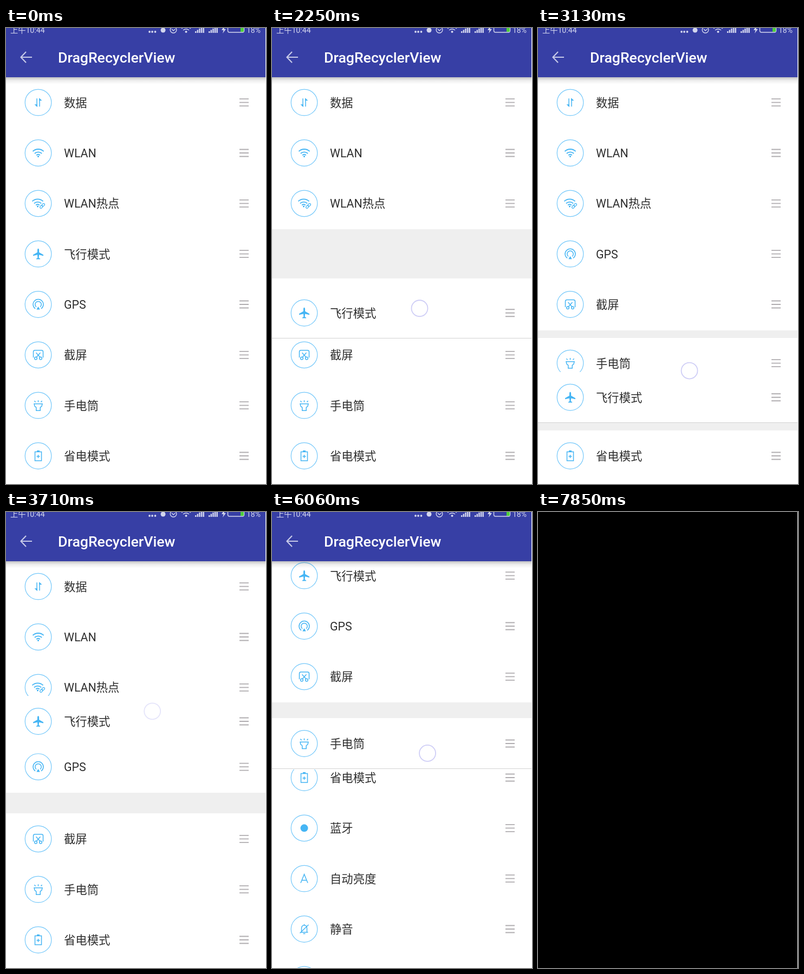
These frames come from a looping animation (480x843 px, 7950 ms). An HTML page:

```html
<!DOCTYPE html>
<html lang="zh">
<head>
<meta charset="utf-8">
<title>DragRecyclerView</title>
<style>
  html, body { margin: 0; height: 100%; overflow: hidden; background: #fff; }
  svg { display: block; width: 100vw; height: 100vh; }
  text { font-family: Roboto, "Noto Sans CJK SC", "Noto Sans CJK", sans-serif; }
  .row text { font-size: 21.33px; fill: #2e2e2e; }
  .icon { fill: none; stroke: #45b5f4; stroke-width: 1.5; }
  .icon .solid { fill: #45b5f4; stroke: none; }
  #status { fill: #d3d6ee; font-size: 14.2px; }
  #status .line { fill: none; stroke: #d3d6ee; stroke-width: 1.4; }
</style>
</head>
<body>
<svg viewBox="0 0 480 843">
  <defs>
    <linearGradient id="shade" x2="0" y2="1">
      <stop offset="0" stop-opacity=".24"/>
      <stop offset=".45" stop-opacity=".07"/>
      <stop offset="1" stop-opacity="0"/>
    </linearGradient>
  </defs>
  <rect width="480" height="843" fill="#efefef"/>
  <g id="list"></g>
  <rect y="91" width="480" height="13" fill="url(#shade)"/>
  <rect width="480" height="91" fill="#373fa5"/>
  <path d="M37 44L27.5 54 37 64M27.5 54H48" fill="none" stroke="#c6c9e8" stroke-width="2.2"/>
  <text x="96" y="64" font-size="26.67" font-weight="500" fill="#fff">DragRecyclerView</text>
  <g id="status">
    <text x="8" y="9">上午10:44</text>
    <circle cx="265" cy="7" r="1.9"/><circle cx="270" cy="7" r="1.9"/><circle cx="275.5" cy="7" r="1.9"/>
    <circle cx="290" cy="4" r="4.5"/>
    <g class="line">
      <circle cx="309" cy="3.5" r="5.8"/>
      <path d="M306 2L309 5 312.5 2M324 1Q332.5-5 341 1M327 4Q332.5 0 338 4"/>
      <rect x="409.5" y="-5" width="30" height="13" rx="3"/>
    </g>
    <circle cx="332.5" cy="7" r="2"/>
    <g id="signals"></g>
    <path d="M403-4L398 4H401.5L400 10 406 2H402.5L405-4Z"/>
    <rect x="433" y="-4" width="6" height="11" fill="#4fd03c"/>
    <text x="444" y="9" font-size="14">18%</text>
  </g>
  <circle id="touch" r="15" fill="#fff" fill-opacity=".6" stroke="#cfcef6" stroke-width="1.8"/>
  <rect id="dark" width="480" height="843"/>
  <rect x="479" width="1" height="843" fill="#fff"/>
</svg>
<script>
const LOOP = 7950, PITCH = 93.333, TOP = 137.67;
const STEP = 97.3, SLOP = 11;
const $ = id => document.getElementById(id);

const line = d => `<path d="${d}"/>`;
const solid = d => `<path class="solid" d="${d}"/>`;
const wifi = line('M-10-3A14.5 14.5 0 0 1 10-3M-6.6 1A9.5 9.5 0 0 1 6.6 1M-3.3 4.2A5 5 0 0 1 3.3 4.2') +
  '<circle class="solid" cy="6.5" r="1.6"/>';

const items = [
  ['数据', line('M-2.5-7.5V7M2.5 7.5V-7') + solid('M-1.7 8.5L-7 3.5H-1.7ZM1.7-8.5L7-3.5H1.7Z')],
  ['WLAN', `<g stroke-width="1.9">${wifi}</g>`],
  ['WLAN热点', `<g transform="translate(-1 -1)" stroke-width="1.9">${wifi}</g>` +
    '<g transform="translate(7.5 4.5) rotate(-45)" stroke-width="1.2"><rect x="-5.5" y="-2" width="6" height="4" rx="2"/><rect x="-.5" y="-2" width="6" height="4" rx="2"/></g>'],
  ['飞行模式', solid('M0-10C1.2-10 1.6-8 1.6-6V-3L9.5 1.5V3.5L1.6 1.7 1.1 7 3.6 8.8V9.8H-3.6V8.8L-1.1 7-1.6 1.7-9.5 3.5V1.5L-1.6-3V-6C-1.6-8-1.2-10 0-10Z')],
  ['GPS', line('M-5.5 7.8A9.5 9.5 0 1 1 5.5 7.8M-3.5 4.6A5.7 5.7 0 1 1 3.5 4.6') + solid('M0 4L3.2 9.5H-3.2Z')],
  ['截屏', line('M-9 5V-5.5Q-9-8.5-6-8.5H6Q9-8.5 9-5.5V5M-4-4L3.5 4.5M4-4L-3.5 4.5') +
    '<circle cx="-4.5" cy="6.3" r="2.3"/><circle cx="4.5" cy="6.3" r="2.3"/>'],
  ['手电筒', line('M0-9.5V-6M-7-8.5L-5-6M7-8.5L5-6M-7.5-2.8H7.5L6.5 1.5 3.7 4V9.5H-3.7V4L-6.5 1.5Z')],
  ['省电模式', line('M-6-7.5H6V9H-6ZM-3 1H3M0-2V4') + solid('M-2.5-10H2.5V-7H-2.5Z')],
  ['蓝牙', '<circle class="solid" r="7"/>'],
  ['自动亮度', line('M-6.5 8L0-8 6.5 8M-5 3H5')],
  ['静音', line('M-7 6H7M-5 6V-1Q-5-7 0-7T5-1V6M0-9V-7M-2 8.5H2M-8 7.5L8-8')],
  ['', '']
];

const list = $('list');
const rows = items.map(([label, icon]) => {
  const g = document.createElementNS('http://www.w3.org/2000/svg', 'g');
  g.setAttribute('class', 'row');
  g.innerHTML = `<rect y="-47" width="480" height="94.6" fill="#fff" shape-rendering="crispEdges"/>
    <circle cx="59.5" r="24.3" fill="none" stroke="#74c8fa" stroke-width="1.2"/>
    <g class="icon" transform="translate(59.5 0)">${icon}</g>
    <text x="107" y="8">${label}</text>
    <path d="M431-6.5H448M431 0H448M431 6.5H448" stroke="#b0adb0" stroke-width="1.8"/>
    <rect class="edge" y="46" width="480" height="1" fill="#d2d2d2" shape-rendering="crispEdges"/>`;
  list.append(g);
  return g;
});

for (const x of [349, 374])
  for (let i = 0; i < 5; i++)
    $('signals').innerHTML += `<rect x="${x + i * 3.6}" y="${6 - i * 2.5}" width="2.5" height="${3 + i * 2.5}"/>`;

const span = (t, a, b) => Math.min(1, Math.max(0, (t - a) / (b - a)));
const wave = (t, a, b) => (1 - Math.cos(Math.PI * span(t, a, b))) / 2;
const slow = (t, a, b) => 1 - (1 - span(t, a, b)) ** 2;
const within = (t, a, b) => t >= a && t < b;

const hold = t => 2250 + STEP * Math.floor((t - 2250) / STEP);

// Offset of each dragged row from its own slot
const drags = {
  3: t => 299 * wave(t, 1658, 3092) - 330 * slow(t, 3092, 3730) + 31 * wave(t, 3730, 3920),
  6: t => 237 * wave(t, 5880, 6587) - (237 - 2 * PITCH) * wave(t, 6632, 6822)
};
const scrolled = t => 300 * wave(t, 4110, 4600);

// A neighbour gives way once the dragged row passes its slot
const shifts = [];
for (const key in drags) {
  let passed = 0;
  for (let t = 0; t < LOOP; t++) {
    const d = drags[key](t), item = +key + passed;
    if (d > (passed + 1) * PITCH + SLOP) {
      shifts.push({ item: item + 1, by: -1, start: t });
      passed++;
    } else if (passed && d < (passed - 1) * PITCH - SLOP) {
      shifts.push({ item, by: 1, start: t });
      passed--;
    }
  }
}

function rowY(i, t) {
  let y = TOP + i * PITCH - scrolled(t);
  if (drags[i]) y += drags[i](t);
  for (const s of shifts)
    if (s.item === i) y += s.by * PITCH * wave(t, s.start, s.start + 250);
  return y;
}

// The finger runs slightly ahead of the row it pulls
function finger(t, h) {
  if (t < 4000) {
    const d = drags[3](h + 32);
    return [277 - 7 * span(h, 1658, 2250) + 10 * (d / 240) ** 2, 399 + d];
  }
  if (t < 4800) return [326.5, 643 - scrolled(h)];
  return [286.5 + 2.5 * span(h, 5880, 6628), 403.5 + drags[6](h + 32)];
}

function draw(t) {
  const h = hold(t), active = t < 4200 ? 3 : 6;
  const lifted = within(t, 1260, 3700) || within(t, 5390, 7060);
  if (list.lastChild !== rows[active]) list.append(rows[active]);

  rows.forEach((row, i) => {
    row.setAttribute('transform', `translate(0 ${rowY(i, h).toFixed(2)})`);
    row.querySelector('.edge').style.opacity = lifted && i === active ? 1 : 0;
  });

  const touching = within(t, 650, 3805) || within(t, 4210, 6730);
  const fading = within(t, 3708, 3805) || within(t, 6638, 6730);
  $('touch').setAttribute('transform', `translate(${finger(t, h)})`);
  $('touch').style.opacity = touching ? (fading ? .55 : 1) : 0;
  $('status').style.opacity = t < 7550 ? 1 : .8;
  $('dark').style.display = t < 7850 ? 'none' : '';
}

function tick() {
  draw(performance.now() % LOOP);
  requestAnimationFrame(tick);
}
tick();
</script>
</body>
</html>
```
